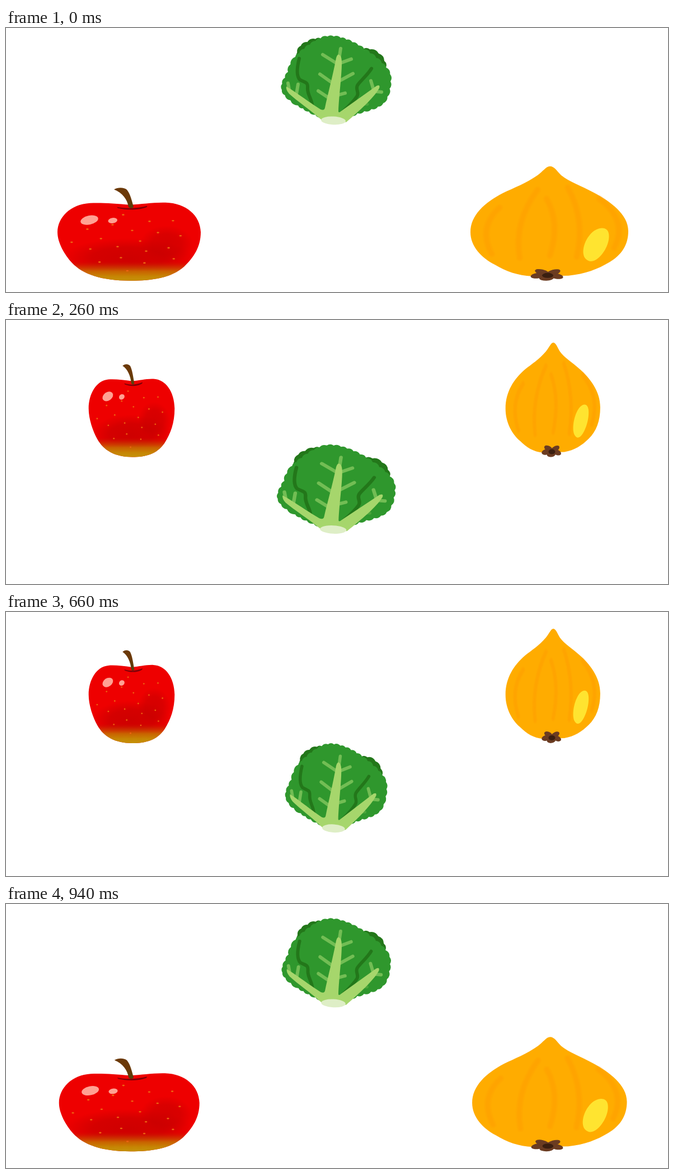
Write an HTML page with a canvas that moves like this. It is 1183x473 px and loops after 0.96 s.

```html
<!DOCTYPE html>
<html lang="en">
<head>
<meta charset="utf-8">
<title>Bouncing vegetables</title>
<style>
  html, body { margin: 0; width: 100%; height: 100%; overflow: hidden; background: #fff; }
  canvas { display: block; }
</style>
</head>
<body>
<canvas id="stage" width="1183" height="473"></canvas>
<script>
const ctx = document.getElementById('stage').getContext('2d');
const LOOP = 960, HALF = LOOP / 2, STEP = 20, PHASE = 4;

// ---------- motion (t runs from 0 to LOOP) ----------
const lerp = (a, b, u) => a + (b - a) * u;
const fromEnd = t => Math.min(t, LOOP - t);

// height left to the top: steady flight, then a soft stop
function fruitDrop(t) {
  const s = fromEnd(t), brake = 264, speed = 0.797;
  if (s < brake) return 240 - speed * s;
  return (240 - speed * brake) * Math.pow((HALF - s) / (HALF - brake), 2.8);
}

function fruitScale(t) {
  return 1 + 0.677 * Math.max(0, 1 - fromEnd(t) / 249);
}

function leafTop(t) {
  const u = fromEnd(t) / HALF;
  const eased = t < HALF ? Math.sin(u * Math.PI / 2) : 1 - Math.pow(1 - u, 1.7);
  return 12 + 280.5 * eased;
}

function leafWidth(t) {
  const rest = 199, wide = 226.5, slim = 171.5, u = t / LOOP;
  if (u < 0.5) return lerp(rest, wide, u * 2);
  return u < 0.75 ? lerp(wide, slim, u * 4 - 2) : lerp(slim, rest, u * 4 - 3);
}

// ---------- drawing helpers ----------
function fill(d, color) {
  ctx.fillStyle = color;
  ctx.fill(new Path2D(d));
}

function stroke(d, color, width) {
  ctx.strokeStyle = color;
  ctx.lineWidth = width;
  ctx.stroke(new Path2D(d));
}

function oval(x, y, rx, ry, color, deg = 0) {
  ctx.fillStyle = color;
  ctx.beginPath();
  ctx.ellipse(x, y, rx, ry, deg * Math.PI / 180, 0, 7);
  ctx.fill();
}

function glow(x, y, rx, ry, rgb, alpha) {
  ctx.save();
  ctx.translate(x, y);
  ctx.scale(rx, ry);
  const g = ctx.createRadialGradient(0, 0, 0, 0, 0, 1);
  g.addColorStop(0, `rgba(${rgb},${alpha})`);
  g.addColorStop(0.55, `rgba(${rgb},${alpha * 0.8})`);
  g.addColorStop(1, `rgba(${rgb},0)`);
  ctx.fillStyle = g;
  ctx.fillRect(-1, -1, 2, 2);
  ctx.restore();
}

function fade(y0, y1, ...colors) {
  const g = ctx.createLinearGradient(0, y0, 0, y1);
  colors.forEach((c, i) => g.addColorStop(i / (colors.length - 1), c));
  return g;
}

// points along a closed Catmull-Rom curve, about `gap` apart
function walk(keys, gap) {
  const n = keys.length, out = [];
  keys.forEach((p1, i) => {
    const p0 = keys[(i + n - 1) % n], p2 = keys[(i + 1) % n], p3 = keys[(i + 2) % n];
    const steps = Math.max(1, Math.round(Math.hypot(p2[0] - p1[0], p2[1] - p1[1]) / gap));
    for (let k = 0; k < steps; k++) {
      const u = k / steps;
      out.push([0, 1].map(c => p1[c] + 0.5 * u * (p2[c] - p0[c]
        + u * (2 * p0[c] - 5 * p1[c] + 4 * p2[c] - p3[c]
        + u * (3 * (p1[c] - p2[c]) + p3[c] - p0[c])))));
    }
  });
  return out;
}

// frilly leaf edge: clockwise curve whose short spans bulge outwards
function frill(keys) {
  const pts = walk(keys, 12), bulge = 0.36;
  let d = `M${pts[0]}`;
  pts.forEach(([x, y], i) => {
    const [nx, ny] = pts[(i + 1) % pts.length];
    const cx = (x + nx) / 2 + (ny - y) * bulge, cy = (y + ny) / 2 - (nx - x) * bulge;
    d += `Q${cx} ${cy} ${nx} ${ny}`;
  });
  return d + 'Z';
}

function place(pivot, scale, dy, draw) {
  ctx.save();
  ctx.translate(pivot, dy);
  ctx.scale(scale, 1);
  ctx.translate(-pivot, 0);
  draw();
  ctx.restore();
}

// ---------- apple ----------
const APPLE = 'M222 317C195 315 172 313 150 314C115 316 92 340 92 366C92 385 105 407 118 421' +
  'C137 441 170 453 222 453C262 453 295 448 318 428C336 411 348 392 348 366' +
  'C347 336 322 314 285 313C262 312.5 243 316 222 317Z';
const STEM = 'M193 289.5C200 285 212 286 216 290C222 297 225 310 228 321' +
  'C225 324 221 323 219 321C217 308 208 295 193 289.5Z';
const DIMPLE = 'M198 321C213 324 236 324 252 319C253 321 250 322 246 323C232 327 213 326 200 323Z';

function drawApple() {
  ctx.save();
  ctx.clip(new Path2D(APPLE));
  ctx.fillStyle = '#ee0000';
  ctx.fillRect(85, 305, 270, 155);
  glow(218, 413, 118, 36, '196,0,0', 0.75);
  glow(287, 388, 48, 34, '196,0,0', 0.6);
  ctx.fillStyle = fade(418, 454, 'rgba(200,20,0,0)', 'rgba(198,70,0,0.5)',
    'rgba(197,115,0,0.85)', 'rgba(196,140,4,0.95)', '#c49408');
  ctx.fillRect(85, 418, 270, 40);
  ctx.restore();

  // specks spread evenly on a sunflower spiral
  for (let i = 0; i < 20; i++) {
    const r = Math.sqrt((i + 0.5) / 20), a = i * 2.4;
    oval(222 + 112 * r * Math.cos(a), 382 + 54 * r * Math.sin(a), 2.3, 1.3, '#ee6412');
  }
  oval(149, 344.3, 16, 8, '#ffa193', -12);
  oval(190.7, 345.2, 8.3, 4.8, '#ffa193', -8);
  fill(DIMPLE, '#7d0008');
  fill(STEM, fade(288, 323, '#6b3908', '#6b3908', '#54420c'));
}

// ---------- onion ----------
const ONION = 'M972 248C965 248 960 257 950 264C930 278 907 287 888 296C855 313 830 336 830 366' +
  'C830 392 850 412 873 424C893 436 915 444 940 445L1005 444C1035 441 1058 432 1078 420' +
  'C1100 407 1112 389 1112 364C1112 334 1080 311 1050 295C1030 284 1005 275 992 264C984 256 980 248 972 248Z';
const STRIPES = 'M950 290Q907 348 918 412M966 306Q991 350 972 408M1004 286Q1036 345 1020 410' +
  'M882 322Q843 358 868 405M1060 306Q1112 345 1087 394';
const SHINE = 'M1036 414C1028 406 1031 385 1044 370C1055 357 1074 354 1077 368' +
  'C1080 383 1070 402 1060 411C1050 420 1042 420 1036 414Z';

function drawOnion() {
  fill(ONION, '#ffac00');
  for (let width = 13; width > 4; width -= 4) stroke(STRIPES, 'rgba(255,148,0,0.13)', width);
  fill(SHINE, '#ffe430');
  for (let deg = -50; deg < 300; deg += 72) {
    const a = deg * Math.PI / 180;
    oval(967 + 17 * Math.cos(a), 442.5 + 5.5 * Math.sin(a), 13, 5, '#6b3c22', 15 * Math.sin(2 * a));
  }
  oval(968, 443.5, 10, 4.5, '#3b1f10');
}

// ---------- cabbage ----------
const LEAF = frill([[585, 166], [522, 138], [493, 110], [504, 78], [517, 51], [562, 18],
  [598, 17], [640, 37], [679, 70], [687, 95], [674, 134], [628, 152]]);
const BACK_LEFT = frill([[521, 53], [527, 31], [562, 18], [546, 46]]);
const BACK_RIGHT = frill([[638, 37], [666, 45], [679, 70], [652, 66]]);
const FOLDS = 'M524 54C520 70 519 85 525 92C535 98 540 95 539 108C539 118 545 125 547 136' +
  'M653 72C645 85 632 95 628 102C624 110 632 115 627 122C620 133 612 140 602 149';
const VEINS = 'M598 36L595 56M566 47L590 62M561 82L582 97M558 112L576 124M617 55L598 62' +
  'M620 81L598 93M606 116L595 119M504 98L506 109M522 100L519 118M652 94L657 111M660 113L671 114';
const RIBS = 'M595 47C599 49 600 54 600 62C600 85 595 120 594 149Q595 152 599 148L662 103' +
  'Q669 100 667 107C656 126 632 147 608 168L564 164C545 147 520 130 506 117Q500 110 501 104' +
  'C515 112 540 131 562 145Q569 148 570 142C575 118 584 85 590 53Q592 46 595 47Z';

function drawCabbage() {
  fill(BACK_LEFT, '#23771a');
  fill(BACK_RIGHT, '#23771a');
  fill(LEAF, '#2f972d');
  stroke(FOLDS, '#23771a', 6);
  stroke('M630 135L646 136', '#4aa53a', 5);
  stroke(VEINS, '#72bd54', 6);
  fill(RIBS, '#a6d66c');
  oval(585, 165.2, 22, 7.3, '#deeec6', 3);
}

// ---------- loop ----------
function render(now) {
  const t = (Math.floor(now / STEP) * STEP + PHASE) % LOOP;
  ctx.fillStyle = '#fff';
  ctx.fillRect(0, 0, 1183, 473);
  ctx.lineCap = ctx.lineJoin = 'round';

  const drop = fruitDrop(t) - 237;
  const wide = fruitScale(t) / 1.666;
  place(231.2, wide, drop, drawApple);
  place(986.7, wide, drop, drawOnion);
  place(589.5, leafWidth(t) / 199, leafTop(t) - 15, drawCabbage);
}

const start = performance.now();
function tick() {
  render(performance.now() - start);
  requestAnimationFrame(tick);
}
tick();
</script>
</body>
</html>
```
